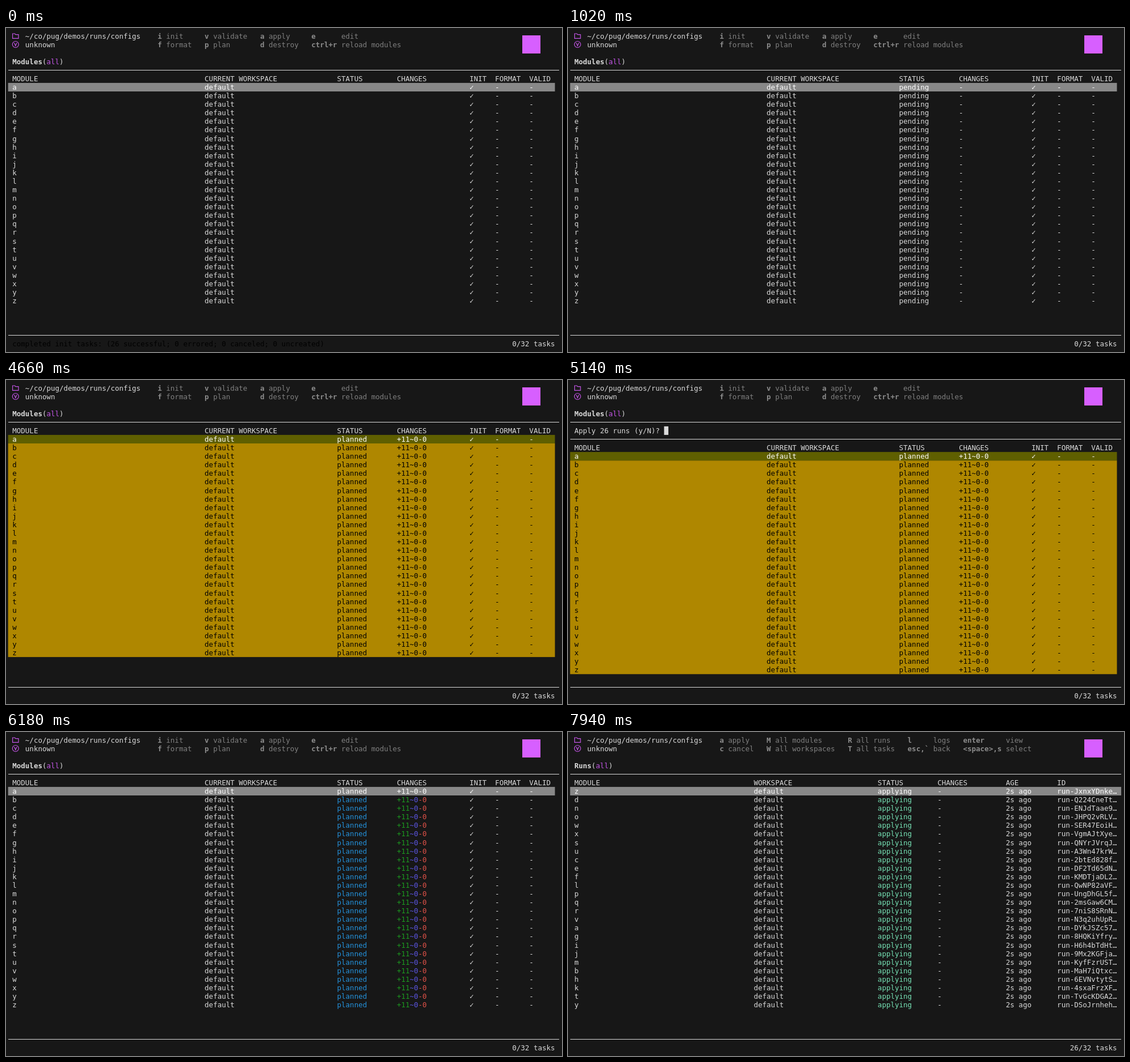
An HTML page with a canvas for the animation above (8 s loop, 980x572 px).

```html
<!DOCTYPE html>
<html lang="en">
<head>
<meta charset="utf-8">
<title>Terminal: modules and runs</title>
<style>
  html, body { margin: 0; height: 100%; overflow: hidden; background: #171717; }
  canvas { display: block; }
</style>
</head>
<body>
<canvas id="stage" width="980" height="572"></canvas>
<script>
const ctx = document.getElementById('stage').getContext('2d');
const LOOP = 8000, CELL = 7.53, ROW = 15.085, LEFT = 3.7, TOP = 6.4;
const FONT = '12.5px "DejaVu Sans Mono", monospace';
const C = {
  bg: '#171717', text: '#dadada', white: '#ffffff', black: '#000000',
  key: '#8c8c8c', hint: '#808080', purple: '#c355e6', logo: '#d75fff',
  cursor: '#888888', marked: '#af8700', markedCursor: '#5f5f00',
  planned: '#2492dc', busy: '#76e2b5',
  add: '#1d9a20', change: '#5b55e2', remove: '#df5148',
};

const MODULES = [...'abcdefghijklmnopqrstuvwxyz'];
const RUN_ORDER = [...'zdnowxsuceflpqrvagijmbhkty'];
const RUN_IDS = ('JxnxYDnke Q224CneTt ENJdTaae9 JHPQ2vRLV SER47EoiH VgmAJtXye QNYrJVrqJ ' +
  'A3Wn47krW 2btEd828f DF2Td65dN KMDTjaDL2 QwNP82aVF UngDhGL5f 2msGaw6CM 7niS8SRnN ' +
  'N3q2uhUpR DYkJSZc57 8HQKiYfry H6h4bTdHt 9Mx2KGFja KyfFzrUST MaH7iQtxc 6EVNvtytS ' +
  '4sxaFrzXF TvGcKDGA2 DSoJrnheh').split(' ');

// Each hint: key column, label column, then key and label for both rows.
const MODULE_HINTS = [
  [35, 37, 'i', 'init', 'f', 'format'],
  [46, 48, 'v', 'validate', 'p', 'plan'],
  [59, 61, 'a', 'apply', 'd', 'destroy'],
  [71, 78, 'e', 'edit', 'ctrl+r', 'reload modules'],
];
const RUN_HINTS = [
  [35, 37, 'a', 'apply', 'c', 'cancel'],
  [46, 48, 'M', 'all modules', 'W', 'all workspaces'],
  [65, 67, 'R', 'all runs', 'T', 'all tasks'],
  [79, 85, 'l', 'logs', 'esc,`', 'back'],
  [92, 102, 'enter', 'view', '<space>,s', 'select'],
];

const PLAN_STEPS = [1420, 1460, 1520, 1560, 1620];

const colX = col => LEFT + col * CELL;
const rowY = row => TOP + row * ROW;

// Text sits on the terminal's character grid.
function put(col, row, text, color = C.text, bold = false) {
  ctx.font = (bold ? 'bold ' : '') + FONT;
  ctx.fillStyle = color;
  [...text].forEach((ch, i) => {
    if (ch !== ' ') ctx.fillText(ch, colX(col + i), rowY(row) + 12.1);
  });
}

// Fills whole rows of the grid; the outer edges stay soft.
function bar(row, count, endCol, color) {
  ctx.fillStyle = color;
  ctx.fillRect(LEFT, rowY(row), endCol * CELL, count * ROW);
}

function rule(row) {
  ctx.fillStyle = C.text;
  ctx.fillRect(4, Math.round(rowY(row) + ROW / 2), 971, 1);
}

function drawIcons() {
  ctx.strokeStyle = C.purple;
  ctx.lineWidth = 1.2;
  ctx.stroke(new Path2D('M11.6 10h4l1.4 1.6h5v6.8H11.6z'));
  ctx.stroke(new Path2D('M22.3 29a5.5 5.5 0 1 1-11 0a5.5 5.5 0 1 1 11 0M14.6 26.3l2.2 5.2 2.2-5.2'));
}

function drawHeader(title, hints) {
  drawIcons();
  put(4, 0, '~/co/pug/demos/runs/configs');
  put(4, 1, 'unknown');
  for (const [keyCol, labelCol, ...words] of hints) {
    for (const row of [0, 1]) {
      put(keyCol, row, words[row * 2], C.key, true);
      put(labelCol, row, words[row * 2 + 1], C.hint);
    }
  }
  ctx.fillStyle = C.logo;
  ctx.fillRect(910, 13, 32, 32);
  put(1, 3, title, C.text, true);
  put(1 + title.length, 3, '(');
  put(2 + title.length, 3, 'all', C.purple);
  put(5 + title.length, 3, ')');
  rule(4);
}

function drawFooter(message, running) {
  rule(35);
  put(1, 36, message, C.black);
  const tasks = running + '/32 tasks';
  put(128 - tasks.length, 36, tasks);
}

function drawChanges(col, row, planned, ink) {
  if (!planned) return put(col, row, '-', ink || C.text);
  put(col, row, '+11', ink || C.add);
  put(col + 3, row, '~0', ink || C.change);
  put(col + 5, row, '-0', ink || C.remove);
}

function statusOf(name, t) {
  if (t < 1020) return '';
  if (t < 1060) return 'pending';
  if (t >= 6220) return 'applying';
  const batch = Math.floor((25 - RUN_ORDER.indexOf(name)) * PLAN_STEPS.length / 26);
  return t < PLAN_STEPS[batch] ? 'planning' : 'planned';
}

function drawModules(t) {
  const marked = (t >= 500 && t < 1020) || (t >= 4660 && t < 6180);
  const prompt = t >= 5140 && t < 6180;
  const head = prompt ? 7 : 5;
  const statuses = MODULES.map(name => statusOf(name, t));

  drawHeader('Modules', MODULE_HINTS);
  if (prompt) {
    put(1, 5, 'Apply 26 runs (y/N)?');
    if (t < 5660) {
      ctx.fillStyle = C.text;
      ctx.fillRect(colX(22), rowY(5), CELL, ROW);
    }
    rule(6);
  }

  put(1, head, 'MODULE');
  put(46, head, 'CURRENT WORKSPACE');
  put(77, head, 'STATUS');
  put(91, head, 'CHANGES');
  put(108, head, 'INIT');
  put(114, head, 'FORMAT');
  put(122, head, 'VALID');

  if (marked) bar(head + 2, MODULES.length - 1, 128, C.marked);
  bar(head + 1, 1, 128, marked ? C.markedCursor : C.cursor);

  MODULES.forEach((name, i) => {
    const row = head + 1 + i, status = statuses[i];
    const ink = i === 0 ? C.white : marked ? C.black : null;
    const plain = ink || C.text;
    put(1, row, name, plain);
    put(46, row, 'default', plain);
    put(108, row, '✓', plain);
    put(114, row, '-', plain);
    put(122, row, '-', plain);
    if (!status) return;
    const color = { pending: C.text, planned: C.planned }[status] || C.busy;
    put(77, row, status, ink || color);
    drawChanges(91, row, status === 'planned', ink);
  });

  let message = '';
  if (t < 500) message = 'completed init tasks: (26 successful; 0 errored; 0 canceled; 0 uncreated)';
  else if (t >= 1060 && t < 4660) message = 'created 26 runs successfully';
  else if (t >= 6260) message = 'created 26 apply tasks successfully';
  drawFooter(message, statuses.filter(s => s === 'planning' || s === 'applying').length);
}

function drawRuns() {
  drawHeader('Runs', RUN_HINTS);
  const columns = [1, 43, 72, 86, 102, 114];
  const cells = (row, words, colorOf) =>
    words.forEach((word, i) => put(columns[i], row, word, colorOf(i)));
  cells(5, ['MODULE', 'WORKSPACE', 'STATUS', 'CHANGES', 'AGE', 'ID'], () => C.text);
  bar(6, 1, 129, C.cursor);
  RUN_ORDER.forEach((name, i) => {
    cells(6 + i, [name, 'default', 'applying', '-', '2s ago', `run-${RUN_IDS[i]}…`],
      col => i === 0 ? C.white : col === 2 ? C.busy : C.text);
  });
  drawFooter('', 26);
}

const start = performance.now();
function frame() {
  const t = (performance.now() - start) % LOOP;
  ctx.fillStyle = C.bg;
  ctx.fillRect(0, 0, 980, 572);
  if (t < 7940) drawModules(t);
  else drawRuns();
  requestAnimationFrame(frame);
}
frame();
</script>
</body>
</html>
```
